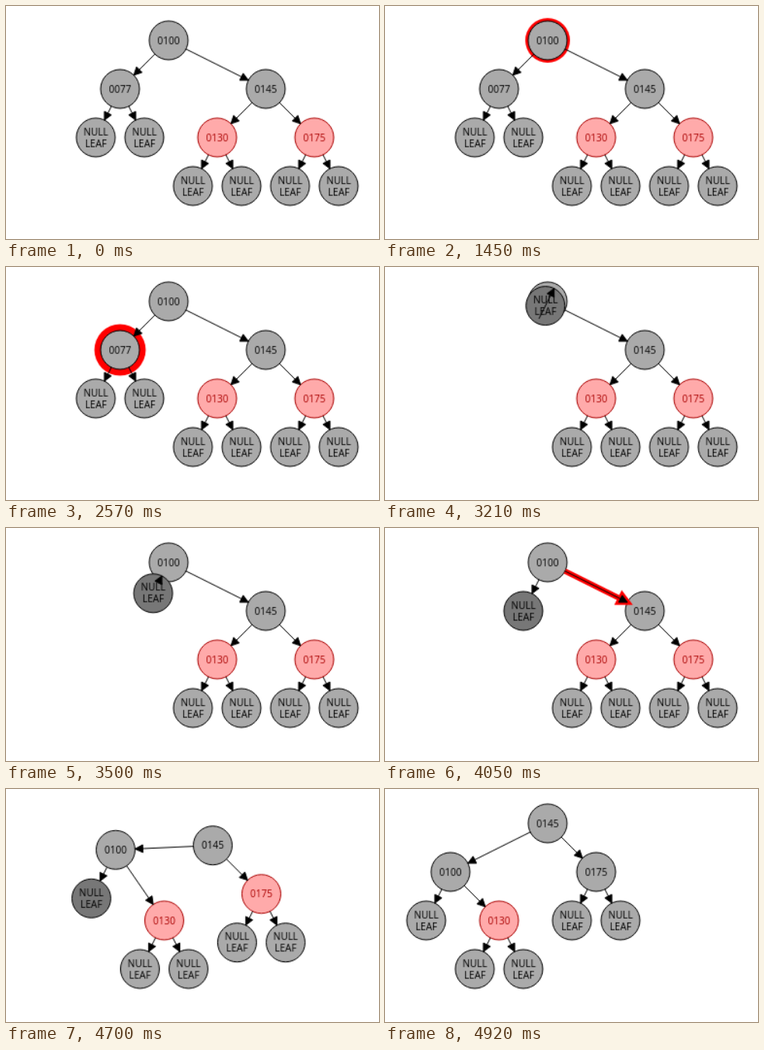
An HTML page with a canvas for the animation above (7030 ms loop, 480x300 px).

```html
<!DOCTYPE html>
<html lang="en">
<head>
<meta charset="utf-8">
<title>Red-black tree deletion</title>
<style>
html, body { margin: 0; width: 100%; height: 100%; overflow: hidden; background: #fff; }
canvas { display: block; width: 480px; height: 300px; }
</style>
</head>
<body>
<canvas id="stage" width="480" height="300"></canvas>
<script>
const screen2d = document.getElementById('stage').getContext('2d');
// The tree is drawn small and shown at 125 % zoom, which softens its edges
const buffer = document.createElement('canvas');
buffer.width = 384;
buffer.height = 240;
const ctx = buffer.getContext('2d');

const LOOP = 7030, R = 20, COL = 25, ROW = 50, ROOT_X = 167, ROOT_Y = 35;
const BLACK = { fill: '#aaaaaa', ink: '#000000' };
const RED = { fill: '#ffaaaa', ink: '#aa0000' };
const DOUBLE = { fill: '#777777', ink: '#000000' };

// Number of ticks passed, the first at `from` and the nth at `to`
function ticks(t, from, to, n) {
  if (t < from) return 0;
  return Math.min(n, 1 + Math.floor((t - from) / (to - from) * (n - 1) + 1e-6));
}

function pulse(t) {
  const u = ((t - 1450) / 245) % 8;
  return 7 - Math.abs(u - 4);
}

// Column and row in the tree grid; lift is the row change in the rotation
function node(label, col, row, style = BLACK, lift = 0) {
  return { label, style, lift, x: ROOT_X + col * COL, y: ROOT_Y + row * ROW };
}

const leaf = (col, row, lift) => node('NULL LEAF', col, row, BLACK, lift);

function disc(x, y, r, fill) {
  ctx.beginPath();
  ctx.arc(x, y, r, 0, Math.PI * 2);
  if (fill) {
    ctx.fillStyle = fill;
    ctx.fill();
  }
}

function drawNode({ x, y, label, style, glow }) {
  if (glow) disc(x, y, R + glow, '#ff0000');
  disc(x, y, R, style.fill);
  ctx.strokeStyle = style.ink;
  ctx.lineWidth = 1;
  ctx.stroke();
  ctx.fillStyle = style.ink;
  const lines = label.split(' ');
  lines.forEach((s, i) => ctx.fillText(s, x, y + 3.6 + 12 * (i - (lines.length - 1) / 2)));
}

function arrow(x1, y1, x2, y2, color, width) {
  const d = Math.hypot(x2 - x1, y2 - y1) || 1;
  const ux = (x2 - x1) / d, uy = (y2 - y1) / d;
  ctx.strokeStyle = ctx.fillStyle = color;
  ctx.lineWidth = width;
  ctx.beginPath();
  ctx.moveTo(x1, y1);
  ctx.lineTo(x2, y2);
  ctx.stroke();
  ctx.beginPath();
  ctx.moveTo(x2, y2);
  ctx.lineTo(x2 - ux * 8 + uy * 4, y2 - uy * 8 - ux * 4);
  ctx.lineTo(x2 - ux * 8 - uy * 4, y2 - uy * 8 + ux * 4);
  ctx.closePath();
  ctx.stroke();
  ctx.fill();
}

function drawEdge([a, b, glow]) {
  const d = Math.hypot(b.x - a.x, b.y - a.y) || 1;
  const dx = (b.x - a.x) / d * R, dy = (b.y - a.y) / d * R;
  const ends = [a.x + dx, a.y + dy, b.x - dx, b.y - dy];
  if (glow) arrow(...ends, '#ff0000', glow);
  arrow(...ends, '#000000', 1);
}

function draw(t) {
  const search = ticks(t, 1450, 2070, 19) + (t >= 2120 ? 1 : 0);
  const visit = ticks(t, 2190, 2750, 13);
  const drop = ticks(t, 3210, 3630, 11) / 11;
  const turn = (ticks(t, 4500, 4700, 6) + ticks(t, 4760, 4920, 5)) / 11;
  const done = turn === 1;

  const n100 = node('0100', 0, 0, BLACK, 1);
  const n145 = node('0145', 4, 1, BLACK, -1);
  const n130 = node('0130', 2, 2, RED);
  const n175 = node('0175', 6, 2, done ? BLACK : RED, -1);
  const leaves = [leaf(1, 3), leaf(3, 3), leaf(5, 3, -1), leaf(7, 3, -1)];
  const nodes = [n100, n145, n130, n175, ...leaves];
  const edges = [
    [n130, leaves[0]], [n130, leaves[1]],
    [n175, leaves[2]], [n175, leaves[3]],
    [n145, n175]
  ];

  if (turn) edges.push([n145, n100], [n100, n130]);
  else edges.push([n100, n145, t >= 4050 ? pulse(t) : 0], [n145, n130]);

  if (search > 0 && search <= 13) n100.glow = pulse(t);

  if (visit < 13) {
    const n77 = node('0077', -2, 1);
    const l = leaf(-3, 2), r = leaf(-1, 2);
    if (visit > 3) n77.glow = pulse(t);
    nodes.push(n77, l, r);
    edges.push([n100, n77], [n77, l], [n77, r]);
  }

  if (drop) {
    const empty = node('NULL LEAF', -drop, drop, done ? BLACK : DOUBLE, 1);
    nodes.push(empty);
    edges.push([n100, empty]);
  }

  for (const n of nodes) {
    n.x -= 4 * COL * turn;
    n.y += n.lift * ROW * turn;
  }

  ctx.fillStyle = '#ffffff';
  ctx.fillRect(0, 0, 384, 240);
  ctx.font = '10px "Open Sans", "Noto Sans", sans-serif';
  ctx.textAlign = 'center';
  nodes.forEach(drawNode);
  edges.forEach(drawEdge);

  if (search > 13 && visit <= 3) {
    const p = (visit ? 8 + visit : search < 20 ? search - 13 : 8) / 11;
    disc(ROOT_X - 2 * COL * p, ROOT_Y + ROW * p, R);
    ctx.strokeStyle = '#007700';
    ctx.lineWidth = 4;
    ctx.stroke();
  }

  screen2d.fillStyle = '#ffffff';
  screen2d.fillRect(0, 0, 480, 300);
  screen2d.drawImage(buffer, 0.5, 0.5, 480, 300);
}

const start = performance.now();
function tick() {
  draw((performance.now() - start) % LOOP);
  requestAnimationFrame(tick);
}
tick();
</script>
</body>
</html>
```
